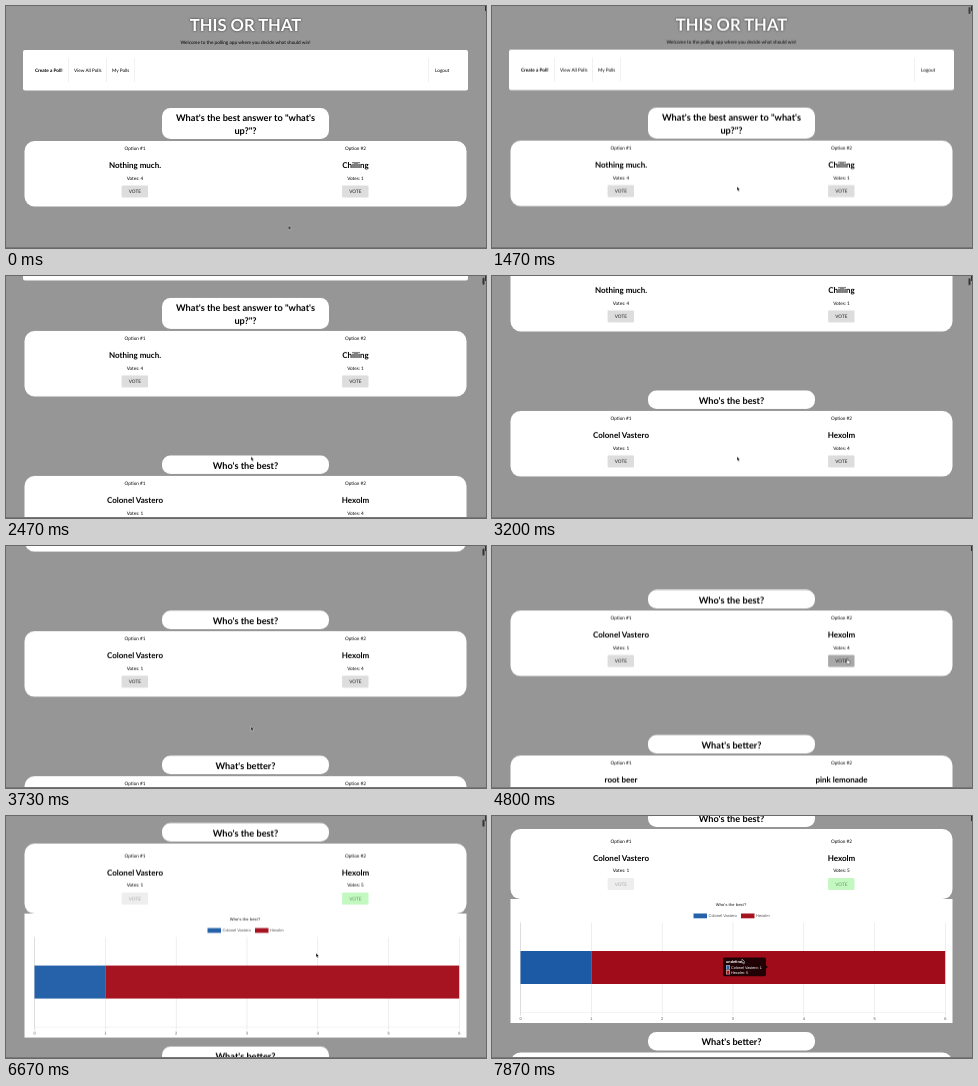
Recreate the animation shown at these times as an HTML page. Size 480 px wide and 242 px high, loop 8 s.

```html
<!DOCTYPE html>
<html lang="en">
<head>
<meta charset="utf-8">
<title>Polls</title>
<style>
html, body { margin: 0; width: 100%; height: 100%; overflow: hidden; background: #969696; }
svg { display: block; width: 480px; height: 242px; font: 4.7px Lato, sans-serif; text-rendering: geometricPrecision; }
.mid { text-anchor: middle; }
.bold { font-weight: 700; }
.logo { font-size: 16.6px; font-weight: 700; fill: #fff; filter: drop-shadow(.8px .9px .9px #333); }
.question { font-size: 9.2px; font-weight: 700; }
.name { font-size: 8px; font-weight: 700; }
.chart { font: 4px "Liberation Sans", Arial, sans-serif; fill: #555; }

.page, .before, .after, .hot, .bars, .blue, .red, .tip, .thumb, .cursor, .arrow, .hand {
  animation: 8s linear infinite;
}
.page { animation-name: scroll; }
.before { animation-name: before; animation-timing-function: step-end; }
.after { animation-name: after; animation-timing-function: step-end; }
.hot { animation-name: hot; }
.bars { animation-name: grow; transform-origin: 28.5px 0; }
.blue { fill: #2562aa; }
.red { fill: #a61421; }
.bars .blue { animation-name: blue; }
.bars .red { animation-name: red; }
.tip { animation-name: tip; fill: #fff; font-size: 3.8px; }
.thumb { animation-name: thumb; }
.cursor { animation-name: move; }
.arrow { animation-name: arrow; animation-timing-function: step-end; }
.hand { animation-name: hand; animation-timing-function: step-end; }

@keyframes scroll {
  0% { transform: translateY(0); }
  17.5% { transform: translateY(0); animation-timing-function: cubic-bezier(.5, 0, .75, .6); }
  25% { transform: translateY(-36.5px); }
  30.875% { transform: translateY(-80px); }
  40% { transform: translateY(-145px); animation-timing-function: cubic-bezier(.3, .4, .6, 1); }
  53% { transform: translateY(-215.5px); }
  67.5% { transform: translateY(-215.5px); animation-timing-function: ease-in-out; }
  74% { transform: translateY(-227px); }
  77% { transform: translateY(-227px); animation-timing-function: ease-in-out; }
  88%, 100% { transform: translateY(-267px); }
}
@keyframes move {
  0%, 4.1% { transform: translate(282.5px, 219.5px); animation-timing-function: ease-in-out; }
  7.5%, 12.5% { transform: translate(278px, 172.5px); animation-timing-function: ease-in-out; }
  15%, 51% { transform: translate(245px, 180.5px); animation-timing-function: ease-in-out; }
  58.5%, 66% { transform: translate(355px, 112.5px); animation-timing-function: ease-in-out; }
  74.5%, 85% { transform: translate(310px, 137px); animation-timing-function: ease-in-out; }
  94%, 100% { transform: translate(250px, 143px); }
}
@keyframes before { 0% { opacity: 1; } 62.5%, 100% { opacity: 0; } }
@keyframes after { 0% { opacity: 0; } 62.5%, 100% { opacity: 1; } }
@keyframes hot { 0%, 57% { fill: #ddd; } 58%, 100% { fill: #a8a8a8; } }
@keyframes grow {
  0%, 62.5% { transform: scaleX(0); animation-timing-function: cubic-bezier(.25, 1, .5, 1); }
  74.5%, 100% { transform: scaleX(1); }
}
@keyframes blue { 0%, 90% { fill: #2562aa; } 92%, 100% { fill: #1d5aa5; } }
@keyframes red { 0%, 90% { fill: #a61421; } 92%, 100% { fill: #a00c1a; } }
@keyframes tip { 0%, 90% { opacity: 0; } 93%, 100% { opacity: 1; } }
@keyframes thumb {
  0%, 17.5% { opacity: 0; transform: translateY(0); }
  18.5% { opacity: 1; transform: translateY(0); }
  54% { opacity: 1; transform: translateY(2px); }
  57%, 67.5% { opacity: 0; transform: translateY(2px); }
  68.5% { opacity: 1; transform: translateY(2px); }
  90% { opacity: 1; transform: translateY(3px); }
  94%, 100% { opacity: 0; transform: translateY(3px); }
}
@keyframes arrow { 0% { opacity: 1; } 57.5% { opacity: 0; } 66.5%, 100% { opacity: 1; } }
@keyframes hand { 0% { opacity: 0; } 57.5% { opacity: 1; } 66.5%, 100% { opacity: 0; } }
</style>
</head>
<body>
<svg id="stage" viewBox="0 0 480 242"></svg>
<script>
const LEFT = 'Colonel Vastero', RIGHT = 'Hexolm';

const rect = (x, y, w, h, fill, r = 0, cls = '') =>
  `<rect x="${x}" y="${y}" width="${w}" height="${h}" rx="${r}" fill="${fill}" class="${cls}"/>`;
const text = (x, y, str, cls = '', fill = '') =>
  `<text x="${x}" y="${y}" class="${cls}"${fill && ` fill="${fill}"`}>${str}</text>`;

const plain = { fill: '#ddd', ink: '#222' };
const hot = { ...plain, cls: 'hot' };
const chosen = { fill: '#c3f8c1', ink: '#6f936e' };
const off = { fill: '#eee', ink: '#aaa' };

function option(x, y, number, [name, votes, button]) {
  return text(x, y + 9.2, `Option #${number}`, 'mid')
    + text(x, y + 26.9, name, 'mid name')
    + text(x, y + 38.6, `Votes: ${votes}`, 'mid')
    + rect(x - 13.4, y + 44.5, 26.4, 12, button.fill, 1, button.cls)
    + text(x - .2, y + 52.2, 'VOTE', 'mid', button.ink);
}

function poll(y, lines, first, second, pad = 0) {
  const height = lines.length > 1 ? 31 : 18.6;
  const top = y + height + 2;
  return rect(156, y, 167, height, '#fff', 8.5)
    + lines.map((line, i) => text(239.5, y + 13 + i * 12.5, line, 'mid question')).join('')
    + rect(18.5, top, 442, 65.5 + pad, '#fff', 10)
    + option(129, top + pad, 1, first)
    + option(349.5, top + pad, 2, second);
}

function chart(y) {
  const step = 70.83, ticks = [0, 1, 2, 3, 4, 5, 6];
  const at = n => 28.5 + n * step;
  return `<g class="chart">`
    + rect(18.5, y, 442, 124, '#fff')
    + text(239, y + 7, "Who's the best?", 'mid bold')
    + rect(201.5, y + 14.5, 13.5, 4.8, '', 0, 'blue') + text(216.5, y + 18.3, LEFT)
    + rect(249, y + 14.5, 13.5, 4.8, '', 0, 'red') + text(264, y + 18.3, RIGHT)
    + ticks.map(n => rect(at(n) - .25, y + 23.5, .5, 93, n ? '#ddd' : '#bbb')
      + text(at(n), y + 120.5, n, 'mid')).join('')
    + rect(28.5, y + 113.5, 6 * step, .4, '#e4e4e4')
    + `<g class="bars">${rect(28.5, y + 52, step, 33, '', 0, 'blue')}${rect(at(1), y + 52, 5 * step - .3, 33, '', 0, 'red')}</g>`
    + `<g class="tip">${rect(231, y + 58.5, 43, 18.7, '#000c', 1.6)}`
    + `<path d="M274 ${y + 66.5}l2 1.5-2 1.5z" fill="#000c"/>`
    + text(234, y + 63.8, 'undefined', 'bold')
    + [['blue', `${LEFT}: 1`], ['red', `${RIGHT}: 5`]].map(([cls, label], i) => {
      const row = y + 66.4 + i * 4.9;
      return rect(234, row, 4, 4, '#fff') + rect(234.4, row + .4, 3.2, 3.2, '', 0, cls) + text(239, row + 3.4, label);
    }).join('')
    + `</g></g>`;
}

const header = text(239.5, 24.9, 'THIS OR THAT', 'mid logo')
  + text(239.5, 38, 'Welcome to the polling app where you decide what should win!', 'mid')
  + rect(17, 44, 445, 40.5, '#fff', 2)
  + text(29, 65.9, 'Create a Poll!', 'bold') + text(68, 65.9, 'View All Polls')
  + text(106, 65.9, 'My Polls') + text(429, 65.9, 'Logout')
  + [62.5, 100.5, 128.5, 422.5].map(x => rect(x, 52, .5, 24, '#e2e2e2')).join('');

const best = ["Who's the best?"];
const drinks = y => poll(y, ["What's better?"], ['root beer', 2, plain], ['pink lemonade', 3, plain]);

document.getElementById('stage').innerHTML = rect(0, 0, 480, 242, '#969696')
  + `<g class="page">${header}`
  + poll(102, ["What's the best answer to \"what's", 'up?"?'], ['Nothing much.', 4, plain], ['Chilling', 1, plain])
  + `<g class="before">${poll(259.5, best, [LEFT, 1, plain], [RIGHT, 4, hot])}${drinks(404.5)}</g>`
  + `<g class="after">${poll(259.5, best, [LEFT, 1, off], [RIGHT, 5, chosen], 4.5)}${chart(350)}${drinks(483)}</g>`
  + `</g>`
  + rect(0, 241, 480, 1, '#777') + rect(479, 0, 1, 5, '#333')
  + rect(476.5, 1, 2, 7, '#333', 1, 'thumb')
  + `<g class="cursor" stroke-width=".4">`
  + `<path class="arrow" d="M0 0V4.3L1 3.4 1.7 5 2.4 4.7 1.7 3.2H3z" fill="#000" stroke="#fff"/>`
  + `<path class="hand" d="M0 .4Q.5-.3.9.4V2L3 2.6V4L2.5 5.4H.4L-1 3.4-.6 2.8 0 3.3z" fill="#fff" stroke="#000"/>`
  + `</g>`;
</script>
</body>
</html>
```
